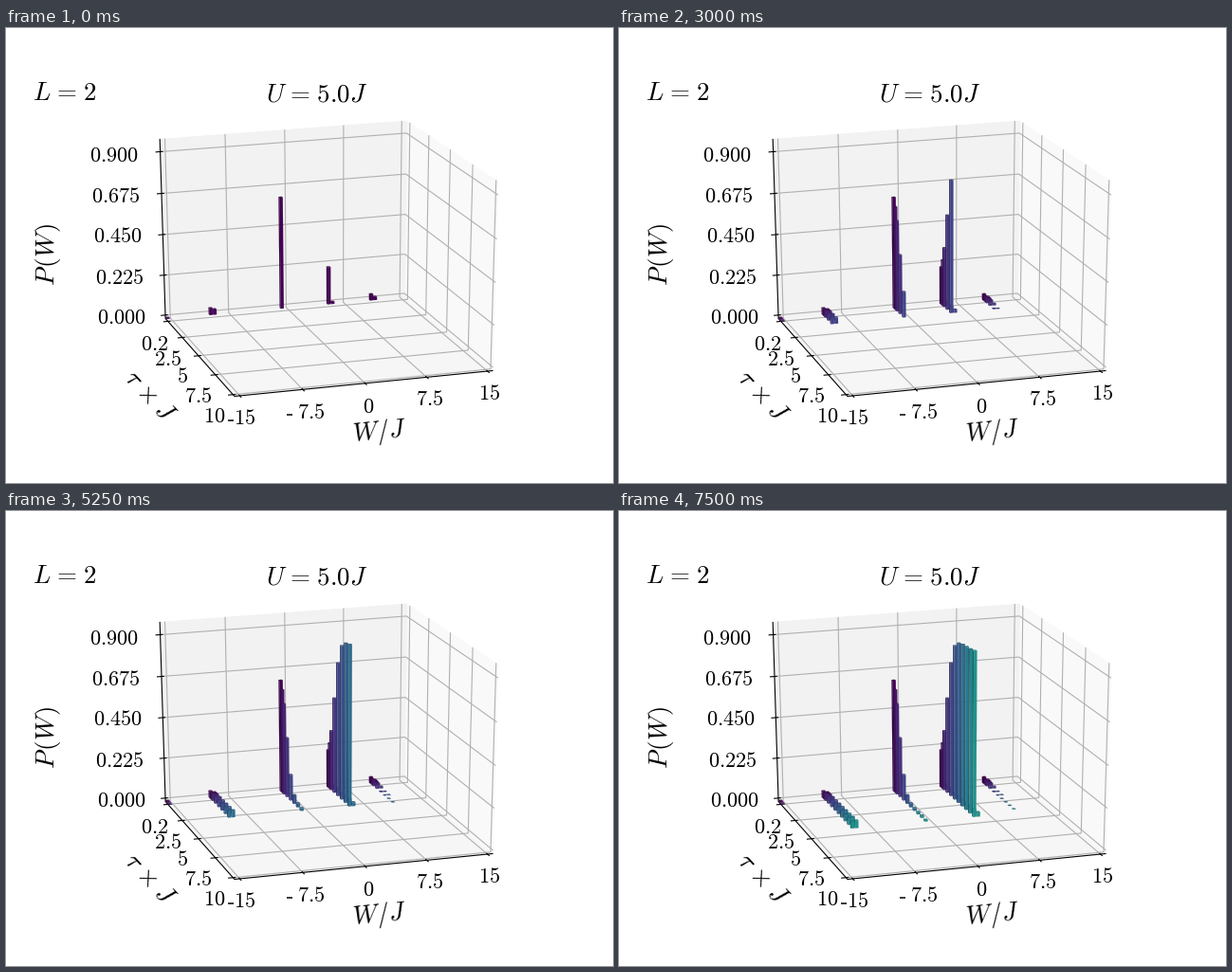
These frames come from a looping animation (640x480 px, 8 s). A matplotlib script:

```python
import matplotlib.pyplot as plt
import numpy as np
from matplotlib.animation import FuncAnimation
from matplotlib.collections import PolyCollection
from matplotlib.colors import to_rgb

plt.rcParams["mathtext.fontset"] = "cm"

WIDTH, HEIGHT, DPI = 640, 480, 100
W_MIN, W_MAX = -15.625, 15.625
T_MIN, T_MAX = -0.208, 10.208
Z_TOP = 0.946
Z_MIN, Z_MAX = -Z_TOP / 48, Z_TOP * 49 / 48

# Perspective camera: screen corners of the box and their depth weights
ORIGIN = np.array([167.6, 306, 1.0])
EDGE_W = 1.023 * np.array([419.5, 283, 1]) - ORIGIN
EDGE_T = 0.918 * np.array([240.4, 388, 1]) - ORIGIN
EDGE_Z = 0.968 * np.array([161.7, 117, 1]) - ORIGIN


def project(w, t, z):
    u = (w - W_MIN) / (W_MAX - W_MIN)
    v = (t - T_MIN) / (T_MAX - T_MIN)
    s = (z - Z_MIN) / (Z_MAX - Z_MIN)
    x, y, d = ORIGIN + u * EDGE_W + v * EDGE_T + s * EDGE_Z
    return x / d, y / d


fig = plt.figure(figsize=(WIDTH / DPI, HEIGHT / DPI), dpi=DPI, facecolor="white")
ax = fig.add_axes([0, 0, 1, 1])
ax.set_xlim(-0.5, WIDTH - 0.5)
ax.set_ylim(HEIGHT - 0.5, -0.5)
ax.axis("off")


def path(points, color, lw=0.8, zorder=2):
    xs, ys = zip(*(project(*p) for p in points))
    ax.plot(xs, ys, color=color, lw=lw, zorder=zorder)


def pane(points, color):
    ax.fill(*zip(*(project(*p) for p in points)), fc=color, ec=color, lw=0.8, zorder=1)


def label(x, y, text, size=16, **kw):
    opts = dict(ha="center", va="baseline", color="black", zorder=4) | kw
    ax.text(x, y, f"${text}$", fontsize=size, **opts)


# Panes
pane([(W_MIN, T_MIN, Z_MIN), (W_MAX, T_MIN, Z_MIN),
      (W_MAX, T_MAX, Z_MIN), (W_MIN, T_MAX, Z_MIN)], "#f6f6f6")
pane([(W_MAX, T_MIN, Z_MIN), (W_MAX, T_MAX, Z_MIN),
      (W_MAX, T_MAX, Z_MAX), (W_MAX, T_MIN, Z_MAX)], "#f9f9f9")
pane([(W_MIN, T_MIN, Z_MIN), (W_MAX, T_MIN, Z_MIN),
      (W_MAX, T_MIN, Z_MAX), (W_MIN, T_MIN, Z_MAX)], "#f2f2f2")

# Grid and tick marks
GRID = "#b0b0b0"
W_TICKS = [-15, -7.5, 0, 7.5, 15]
T_TICKS = [0.2, 2.5, 5, 7.5, 10]
Z_TICKS = [0, 0.225, 0.45, 0.675, 0.9]
dw, dt = (W_MAX - W_MIN) / 120, (T_MAX - T_MIN) / 120

for w in W_TICKS:
    path([(w, T_MIN, Z_MAX), (w, T_MIN, Z_MIN), (w, T_MAX, Z_MIN)], GRID)
    path([(w, T_MAX + 2 * dt, Z_MIN), (w, T_MAX - dt, Z_MIN)], "black", zorder=3)
for t in T_TICKS:
    path([(W_MAX, t, Z_MAX), (W_MAX, t, Z_MIN), (W_MIN, t, Z_MIN)], GRID)
    path([(W_MIN - 2 * dw, t, Z_MIN), (W_MIN + dw, t, Z_MIN)], "black", zorder=3)
for z in Z_TICKS:
    path([(W_MIN, T_MIN, z), (W_MAX, T_MIN, z), (W_MAX, T_MAX, z)], GRID)
    path([(W_MIN - 2 * dw, T_MIN, z), (W_MIN + dw, T_MIN, z)], "black", zorder=3)

# Axis lines
path([(W_MIN, T_MIN, Z_MAX), (W_MIN, T_MIN, Z_MIN),
      (W_MIN, T_MAX, Z_MIN), (W_MAX, T_MAX, Z_MIN)], "black", zorder=3)

# Tick labels
for i, y in enumerate([140.5, 183.5, 226, 269, 311]):
    label(113.2 + 2 * i, y, f"{0.9 - 0.225 * i:.3f}")
for x, y, s in [(156, 339, "0.2"), (170, 356, "2.5"), (185.5, 374, "5"),
                (202, 394.5, "7.5"), (219, 415, "10")]:
    label(x, y, s)
for x, y, s in [(251, 418, "15"), (321.5, 412, "7.5"), (381.5, 405, "0"),
                (446, 398, "7.5"), (509, 391, "15")]:
    label(x, y, s)
for x, y in [(233.5, 413), (295.5, 407)]:
    ax.plot([x, x + 5.5], [y, y], color="black", lw=1.1, solid_capstyle="butt")

# Axis names and titles
BIG = 19.4
label(61.2, 76, r"L\hspace{0.1}=\hspace{0.1}2", BIG)
label(327.2, 77.5, r"U\hspace{0.11}=\hspace{0.11}5.0J", BIG)
turned = dict(va="center", rotation_mode="anchor")
label(43.5, 238.5, r"P\hspace{0.1}(W\hspace{0.06})", BIG, rotation=90, **turned)
label(394, 426.5, "W/J", BIG, rotation=5.7, **turned)
label(151, 388, r"\tau\hspace{0.12}\times\hspace{0.05}J", BIG,
      rotation=-46.9, **turned)

# Probability of each work value, one entry per duration
TAUS = [0.2, 0.4, 0.6, 1, 1.5, 2, 2.5, 3, 3.5, 4, 4.5]
N = len(TAUS)
PEAKS = {
    -15.7: [0.006, 0.004, 0.002],
    -10.2: np.linspace(0.038, 0.037, N),
    -9.7: np.linspace(0.030, 0.041, N),
    -1.02: [0.62, 0.575, 0.505, 0.33, 0.143, 0.048, 0.022,
            0.015, 0.013, 0.013, 0.009],
    5.1: [0.21, 0.257, 0.332, 0.527, 0.735, 0.844, 0.873,
          0.882, 0.886, 0.889, 0.896],
    5.6: np.linspace(0.012, 0.024, N),
    10.7: [0.035, 0.03, 0.022, 0.012, 0.002] + [0] * 5,
    11.2: [0.018, 0.017, 0.014, 0.010, 0, 0],
}
BAR_W, FRONT = 0.39, 0.15


def bar_faces(w, t, h):
    w0, w1 = w - BAR_W / 2, w + BAR_W / 2
    t1 = t + FRONT
    left = [(w0, t, 0), (w0, t1, 0), (w0, t1, h), (w0, t, h)]
    top = [(w0, t, h), (w1, t, h), (w1, t1, h), (w0, t1, h)]
    front = [(w0, t1, 0), (w1, t1, 0), (w1, t1, h), (w0, t1, h)]
    return [[project(*p) for p in face] for face in (left, top, front)]


rows = []
for i, t in enumerate(TAUS):
    base = np.array(to_rgb(plt.cm.viridis(i / 20)[:3]))
    faces, colors = [], []
    for w, heights in reversed(PEAKS.items()):
        if i < len(heights):
            faces += bar_faces(w, t, heights[i])
            colors += [base * 0.72, base * 0.8, base]
    row = PolyCollection(faces, facecolors=colors, edgecolors=colors,
                         linewidths=0.1, zorder=5 + i)
    ax.add_collection(row, autolim=False)
    rows.append(row)


def update(frame):
    shown = frame // 3 + 1
    for i, row in enumerate(rows):
        row.set_visible(i < shown)
    return rows


anim = FuncAnimation(fig, update, frames=32, interval=250, repeat=True,
                     repeat_delay=0, init_func=lambda: update(0), blit=False)
plt.show()
```
